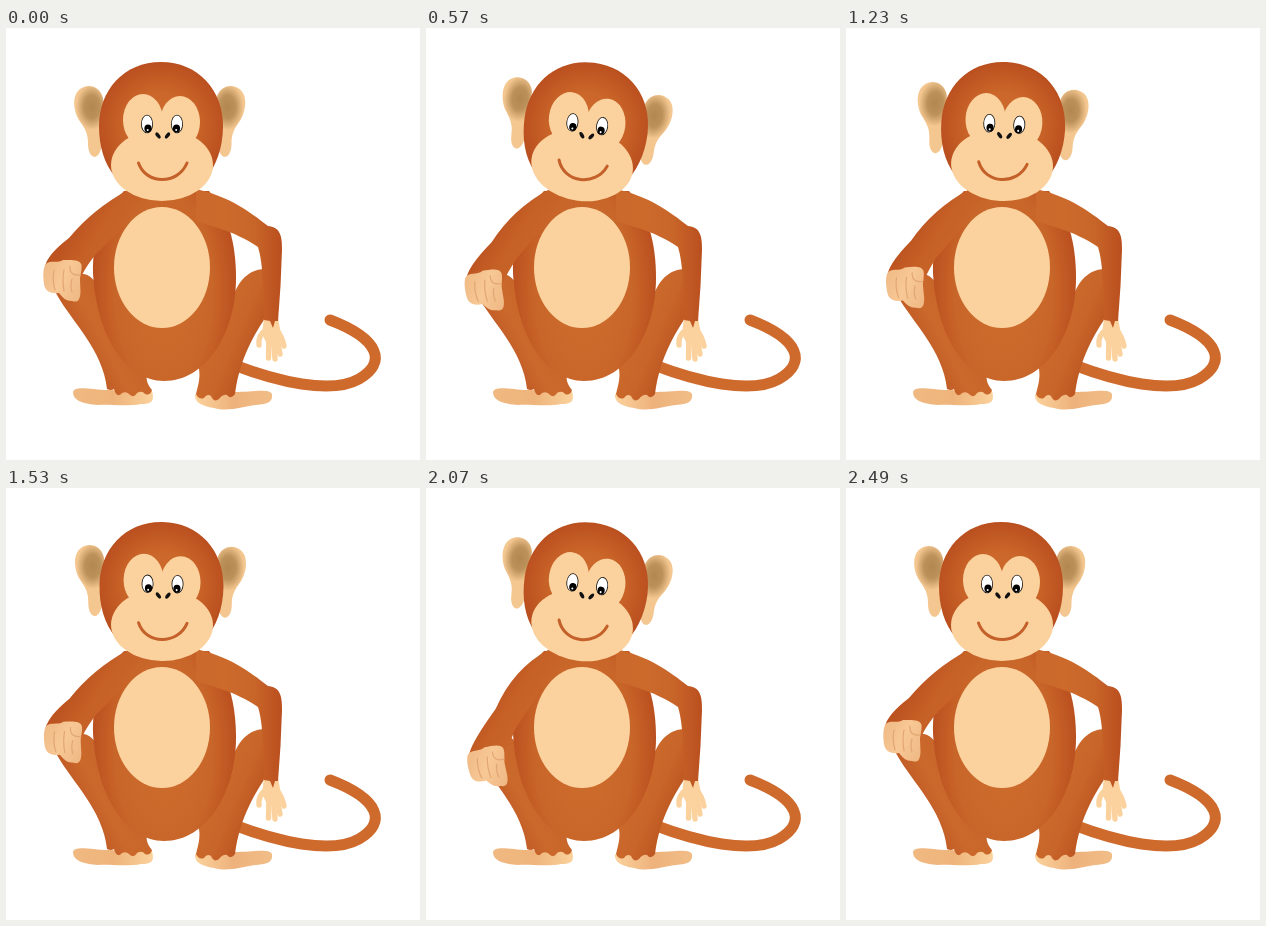
Animation, 414 px wide and 432 px high, one loop 2.91 s. Source, as an HTML page with a canvas:

```html
<!DOCTYPE html>
<html lang="en">
<head>
<meta charset="utf-8">
<title>Monkey</title>
<style>
html, body { margin: 0; width: 100%; height: 100%; overflow: hidden; background: #fff; }
canvas { display: block; width: 414px; height: 432px; }
</style>
</head>
<body>
<canvas id="stage" width="414" height="432"></canvas>
<script>
const ctx = document.getElementById('stage').getContext('2d');
const LOOP = 2910, STEP = 30;
const SKIN = '#fbd29d', LIGHT = '#cd6b2d';

// time, head tilt in degrees, hand offset x and y, hand turn in degrees
const KEYS = [
  [0, 0, 0, 0, 0],
  [210, 0, 2, 10.5, -7],
  [570, 7.2, 2, 10.5, -7],
  [720, 7.2, 7, 17, -8],
  [1620, 0, 0, 0, 0],
  [2070, 7.2, 5, 27, -10],
  [2490, 0, 0, 0, 0],
  [LOOP, 0, 0, 0, 0]
];

function poseAt(t) {
  const i = KEYS.findIndex(key => key[0] > t);
  const a = KEYS[i - 1], b = KEYS[i];
  const k = (t - a[0]) / (b[0] - a[0]);
  const [head, x, y, turn] = a.slice(1).map((v, n) => v + (b[n + 1] - v) * k);
  return { head, x, y, turn };
}

function withStops(gradient, stops) {
  stops.forEach((color, i) => gradient.addColorStop(i / (stops.length - 1), color));
  return gradient;
}
const linear = (x0, y0, x1, y1, ...stops) =>
  withStops(ctx.createLinearGradient(x0, y0, x1, y1), stops);
const radial = (x, y, r, ...stops) =>
  withStops(ctx.createRadialGradient(x, y, 0, x, y, r), stops);

function fill(path, style) {
  ctx.fillStyle = style;
  ctx.fill(new Path2D(path));
}

// Fills a path with an elliptical gradient.
function shade(path, x, y, rx, ry, ...stops) {
  ctx.save();
  ctx.clip(new Path2D(path));
  ctx.translate(x, y);
  ctx.scale(rx, ry);
  ctx.fillStyle = radial(0, 0, 1, ...stops);
  ctx.fillRect(-3, -3, 6, 6);
  ctx.restore();
}

function stroke(path, style, width) {
  ctx.strokeStyle = style;
  ctx.lineWidth = width;
  ctx.stroke(new Path2D(path));
}

function oval(x, y, rx, ry, style, turn = 0) {
  ctx.fillStyle = style;
  ctx.beginPath();
  ctx.ellipse(x, y, rx, ry, turn, 0, 2 * Math.PI);
  ctx.fill();
}

function turned(x, y, degrees, draw) {
  ctx.save();
  ctx.translate(x, y);
  ctx.rotate(degrees * Math.PI / 180);
  ctx.translate(-x, -y);
  draw();
  ctx.restore();
}

function drawTail() {
  stroke('M228 337 C270 353 325 367 353 351 C381 335 374 311 324 292', '#cf6a2d', 11);
}

function drawFeet() {
  fill('M67 364 C69 357 86 362 102 362 L146 363 C149 374 145 376 135 376 C122 379 102 376 92 377 C78 376 67 373 67 364Z',
    linear(68, 0, 148, 0, '#f0b981', '#eeb47b', SKIN));
  fill('M189 366 L228 364 C245 364 264 360 266 366 C267 374 262 376 250 377 C235 379 222 384 208 380 C195 378 188 374 189 366Z',
    linear(189, 0, 266, 0, SKIN, '#eeb27c', '#f1bd87'));
}

function drawLegs() {
  fill('M92 260 C88 248 78 242 66 248 C54 252 47 260 51 267 C66 294 97 322 101 361 Q105 363 108 361 Q111 371 116 365 Q120 363 123 366 Q128 371 131 365 Q136 362 139 366 Q144 368 146 362 C141 356 139 350 142 342 L160 320Z',
    linear(74, 320, 116, 298, '#c05a25', '#cb692c', '#c8652a'));
  fill('M225 275 C232 250 245 240 262 241 L266 280 C250 303 234 328 229 366 Q225 372 221 367 Q217 366 213 371 Q208 375 205 368 Q201 365 198 370 Q193 372 190 366 C193 354 195 348 192 336 L190 300Z',
    linear(212, 297, 252, 314, '#cb692c', '#c8652a', '#bd5621'));
}

function drawTorso() {
  shade('M118 163 C95 185 86 215 87 245 C90 305 118 353 158 353 C200 353 230 305 230 250 C230 215 222 185 203 163Z',
    158, 262, 74, 150, '#cd6b2c', '#cc6a2c', '#c86529', '#b94e1e');
}

function drawBelly() {
  oval(156, 239.5, 48, 60.5, SKIN);
}

function drawRestingArm() {
  for (const finger of ['M260 302 Q252 307 253 317', 'M263 308 L262.5 330', 'M267 308 L269 331', 'M270 305 L274 326', 'M270 301 Q276 308 278 318'])
    stroke(finger, SKIN, 5.4);
  fill('M258 290 L272 290 L275 306 L270 317 L262 318 L256 306Z', SKIN);
  fill('M190 161 C222 168 243 183 262 198 C273 199 276.5 206 276 222 L274.5 258 L272 293 L269 293 L267 300 L264 293 L258 292 C258 265 257 235 252 219 C240 211 228 205 212 200 L190 193Z',
    linear(190, 200, 277, 200, '#cb682b', '#cc6a2c', '#c86529', '#b94e1e'));
}

function drawMovingArm({ x, y, turn }) {
  const wristX = 39 + x * 0.9, wristY = 238 + y;
  const innerX = 76 + x * 0.7, innerY = 244 + y * 0.6;
  fill(`M122 162 Q87 181 ${63 + y * 0.25} ${210 + y * 0.4}
        Q${wristX + 3} ${wristY - 12} ${wristX} ${wristY}
        L${innerX} ${innerY + 3} Q${innerX + 5} ${innerY - 7} 90 ${226 + y * 0.5}
        L118 198 L135 165Z`,
    linear(52, 205, 108, 240, '#b94e1e', '#c56026', '#ca672a'));
  ctx.save();
  ctx.translate(x, y);
  turned(57, 252, turn, drawFist);
  ctx.restore();
}

function drawFist() {
  fill('M39 237 C43 231 51 236 57 232 C65 232 74 231 75.5 237 C76 243 74 247 74 252 L74.5 264 C74 272 72 275 66 273 C60 273 57 270 53 265 C46 266 39 264 38 256 C37 248 37 242 39 237Z',
    linear(38, 240, 76, 260, '#f0bb86', '#f7c895', '#f0ba86'));
  for (const crease of ['M48 242 Q46 252 49 262', 'M58 242 Q56 252 58 263', 'M64 238 Q63 248 74 247', 'M66 251 Q64 258 66 264'])
    stroke(crease, '#e2a673', 1.2);
}

function drawEar() {
  const shape = 'M97 70 C94 58 82 55 74 61 C66 67 67 82 73 92 C80 102 82 106 82 116 C82 126 87 131 91 128 C97 124 96 110 98 100Z';
  shade(shape, 86, 79, 16, 23, '#b38750', '#bd915a', '#f4c790');
}

function drawEye(x, pupilX) {
  oval(x, 96, 6, 9.2, '#111');
  oval(x, 96, 5.2, 8.4, '#fff');
  oval(pupilX, 100.5, 3.6, 4, '#000');
  oval(pupilX - 0.3, 102, 1, 1.1, '#fff');
}

function drawHead() {
  drawEar();
  ctx.save();
  ctx.translate(307.5, 0);
  ctx.scale(-1, 1);
  drawEar();
  ctx.restore();

  fill('M155 34 C192 34 217 62 217 98 C217 120 210 138 200 150 L110 150 C98 136 93 118 93 98 C93 62 118 34 155 34Z',
    radial(155, 98, 66, '#cd6a2c', '#cb672a', '#b94e1e'));
  oval(137, 92, 20, 26, SKIN);
  oval(174, 94, 20, 26, SKIN);
  oval(156, 137, 51, 36, SKIN);

  drawEye(141, 142);
  drawEye(171, 170.5);
  oval(152, 107.5, 1.8, 3.6, '#111', -0.65);
  oval(161.5, 107.5, 1.8, 3.6, '#111', 0.65);
  stroke('M132.5 135 C140 157 172 157 181 135', '#c4602a', 3);
}

function render(now) {
  const t = Math.floor(now % LOOP / STEP) * STEP;
  const pose = poseAt(t);
  ctx.fillStyle = '#fff';
  ctx.fillRect(0, 0, 414, 432);
  ctx.lineCap = 'round';
  drawTail();
  drawFeet();
  drawLegs();
  drawTorso();
  drawRestingArm();
  drawMovingArm(pose);
  drawBelly();
  turned(156, 138, pose.head, drawHead);
}

const start = performance.now();
function tick() {
  render(performance.now() - start);
  requestAnimationFrame(tick);
}
tick();
</script>
</body>
</html>
```
